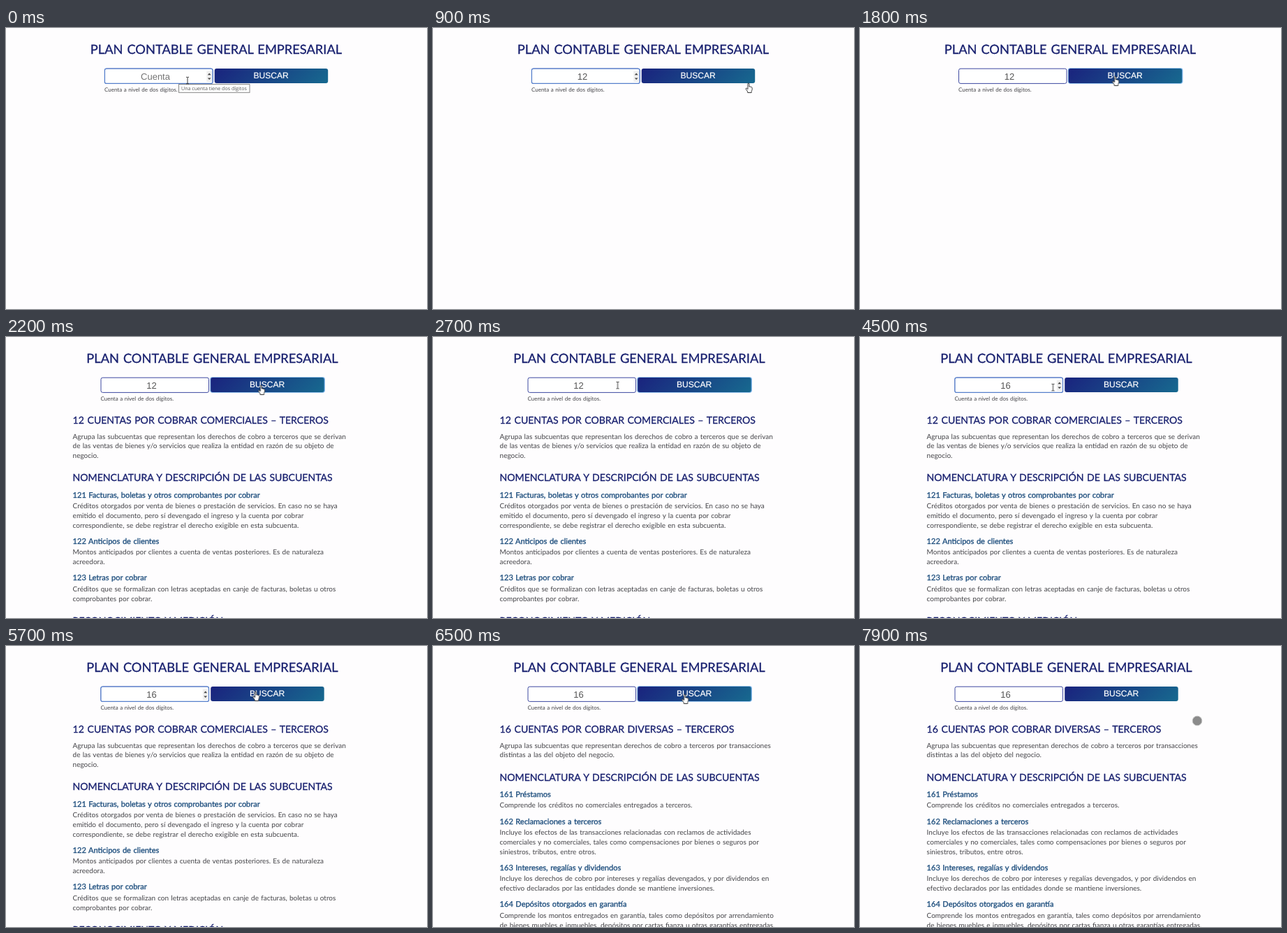
Animation of 603 by 402 pixels, one loop 8000 ms. Source, as an HTML page:

```html
<!DOCTYPE html>
<html lang="es">
<head>
<meta charset="utf-8">
<title>Plan contable</title>
<style>
html, body { margin: 0; width: 100%; height: 100%; overflow: hidden; background: #fefdfe; }
svg { display: block; width: 603px; height: 402px; }
text { font: 10px Lato, "Open Sans", sans-serif; word-spacing: .067em; fill: #444448; text-rendering: geometricPrecision; }
.title, .head { fill: #18206f; stroke: #18206f; stroke-width: .3px; }
.title { font-size: 18.28px; text-anchor: middle; }
.head { font-size: 14.08px; }
.sub { font-size: 11.03px; fill: #1f4f7e; stroke: #1f4f7e; stroke-width: .35px; }
.hint { font-size: 7.97px; }
.tip text { font: 7.1px "Open Sans", sans-serif; word-spacing: 0; fill: #575757; }
.field text, .label { font: 13px "Liberation Sans", Arial, sans-serif; text-anchor: middle; fill: #555; }
.field .empty { fill: #757575; }
.field .marked text { fill: #fff; }
.label { font-size: 12.05px; fill: #fff; stroke: #fff; stroke-width: .2px; }

/* Hard switches share one clock; 1% is 80 ms */
.form, .first, .second, .tip, .focus, .glow, .empty, .one, .twelve, .marked, .sixteen,
.beam, .hand, .arrow, .dot { animation: 8s step-end infinite; }
.form { animation-name: form; }
.first { animation-name: first; }
.second { animation-name: second; }
.tip { animation-name: tip; }
.focus { animation-name: focus; }
.glow { animation-name: glow; }
.empty { animation-name: empty; }
.one { animation-name: one; }
.twelve { animation-name: twelve; }
.marked { animation-name: marked; }
.sixteen { animation-name: sixteen; }
.beam { animation-name: beam; }
.hand { animation-name: hand; }
.arrow { animation-name: arrow; }
.dot { animation-name: dot; }
.cursor { animation: move 8s linear infinite; }

@keyframes form { 0% { transform: none; } 25%, 100% { transform: translateX(-5.5px); } }
@keyframes first { 0%, 75%, 100% { visibility: hidden; } 25% { visibility: visible; } }
@keyframes second { 0% { visibility: hidden; } 75%, 100% { visibility: visible; } }
@keyframes tip { 0% { visibility: visible; } 5%, 100% { visibility: hidden; } }
@keyframes focus { 0%, 41.25% { visibility: visible; } 18.75%, 73.75%, 100% { visibility: hidden; } }
@keyframes glow { 0%, 41.25%, 92.5%, 100% { visibility: hidden; } 18.75%, 73.75% { visibility: visible; } }
@keyframes empty { 0% { visibility: visible; } 5%, 100% { visibility: hidden; } }
@keyframes one { 0%, 7.5%, 55%, 100% { visibility: hidden; } 5%, 52.5% { visibility: visible; } }
@keyframes twelve { 0%, 43.75%, 100% { visibility: hidden; } 7.5% { visibility: visible; } }
@keyframes marked { 0%, 52.5%, 100% { visibility: hidden; } 43.75% { visibility: visible; } }
@keyframes sixteen { 0% { visibility: hidden; } 55%, 100% { visibility: visible; } }
@keyframes beam { 0%, 32.2% { visibility: visible; } 7.5%, 59.5%, 100% { visibility: hidden; } }
@keyframes hand { 0%, 32.2%, 84.7%, 100% { visibility: hidden; } 7.5%, 59.5% { visibility: visible; } }
@keyframes arrow { 0%, 92.5%, 100% { visibility: hidden; } 84.7% { visibility: visible; } }
@keyframes dot { 0% { visibility: hidden; } 92.5%, 100% { visibility: visible; } }
@keyframes move {
  0%, 5% { transform: translate(260px, 75px); }
  7.5% { transform: translate(300px, 76px); }
  11.25% { transform: translate(452px, 79px); }
  16.25% { transform: translate(380px, 72px); }
  18.75%, 27.5% { transform: translate(365.5px, 69px); }
  33.75%, 36.25% { transform: translate(264.5px, 69px); }
  41.25%, 57.5% { transform: translate(276.5px, 72px); }
  67.5%, 73.75% { transform: translate(357.5px, 65px); }
  78.75%, 82.5% { transform: translate(360.5px, 69px); }
  87.5% { transform: translate(578px, 95px); }
  90.6%, 100% { transform: translate(483px, 107px); }
}
</style>
</head>
<body>
<svg viewBox="0 0 603 402">
  <defs>
    <linearGradient id="blue" gradientUnits="userSpaceOnUse" x1="334" y1="23" x2="426" y2="114">
      <stop stop-color="#1a237e"/>
      <stop offset="1" stop-color="#17698f"/>
    </linearGradient>
  </defs>
  <rect width="603" height="402" fill="#fefdfe"/>

  <g class="form">
    <text class="title" x="301" y="37">PLAN CONTABLE GENERAL EMPRESARIAL</text>
    <g class="field">
      <rect x="141.5" y="58.2" width="154.5" height="21.2" rx="2.5" fill="#fff" stroke="#3d48a0"/>
      <g class="focus">
        <rect x="141.4" y="58.2" width="154.6" height="21.2" rx="2.5" fill="#fff" stroke="#567fcc" stroke-width="1.3"/>
        <rect x="287.3" y="61.5" width="7.4" height="15.5" fill="#efefef"/>
        <path d="M288.8 67.2l2.4-2.7 2.4 2.7zM288.8 71.4l2.4 2.7 2.4-2.7z" fill="#444"/>
      </g>
      <text class="empty" x="214" y="73.6">Cuenta</text>
      <text class="one" x="214" y="73.6">1</text>
      <text class="twelve" x="214" y="73.6">12</text>
      <g class="marked">
        <rect x="206.5" y="61.3" width="15.2" height="15" fill="#3390ff"/>
        <text x="214" y="73.6">12</text>
      </g>
      <text class="sixteen" x="214" y="73.6">16</text>
    </g>
    <rect class="glow" x="297.8" y="57.3" width="164.6" height="22.4" rx="3.4" fill="#7db4ea"/>
    <rect x="298.7" y="58" width="162.5" height="21" rx="3" fill="url(#blue)"/>
    <text class="label" x="379.7" y="72.3">BUSCAR</text>
    <text class="hint" x="141" y="90.7">Cuenta a nivel de dos dígitos.</text>
  </g>

  <g class="first" transform="translate(95.6 0)">
    <text class="head" y="124">12 CUENTAS POR COBRAR COMERCIALES – TERCEROS</text>
    <text y="145.5">Agrupa las subcuentas que representan los derechos de cobro a terceros que se derivan</text>
    <text y="159.3">de las ventas de bienes y/o servicios que realiza la entidad en razón de su objeto de</text>
    <text y="173">negocio.</text>
    <text class="head" y="206.3">NOMENCLATURA Y DESCRIPCIÓN DE LAS SUBCUENTAS</text>
    <text class="sub" y="229.5">121 Facturas, boletas y otros comprobantes por cobrar</text>
    <text y="245">Créditos otorgados por venta de bienes o prestación de servicios. En caso no se haya</text>
    <text y="258.8">emitido el documento, pero sí devengado el ingreso y la cuenta por cobrar</text>
    <text y="272.5">correspondiente, se debe registrar el derecho exigible en esta subcuenta.</text>
    <text class="sub" y="295.7">122 Anticipos de clientes</text>
    <text y="311.3">Montos anticipados por clientes a cuenta de ventas posteriores. Es de naturaleza</text>
    <text y="325">acreedora.</text>
    <text class="sub" y="348.2">123 Letras por cobrar</text>
    <text y="363.8">Créditos que se formalizan con letras aceptadas en canje de facturas, boletas u otros</text>
    <text y="377.5">comprobantes por cobrar.</text>
    <text class="head" y="411">RECONOCIMIENTO Y MEDICIÓN</text>
  </g>

  <g class="second" transform="translate(95.6 0)">
    <text class="head" y="124">16 CUENTAS POR COBRAR DIVERSAS – TERCEROS</text>
    <text y="145.5">Agrupa las subcuentas que representan derechos de cobro a terceros por transacciones</text>
    <text y="159.3">distintas a las del objeto del negocio.</text>
    <text class="head" y="192.5">NOMENCLATURA Y DESCRIPCIÓN DE LAS SUBCUENTAS</text>
    <text class="sub" y="215.8">161 Préstamos</text>
    <text y="231.2">Comprende los créditos no comerciales entregados a terceros.</text>
    <text class="sub" y="254.5">162 Reclamaciones a terceros</text>
    <text y="270">Incluye los efectos de las transacciones relacionadas con reclamos de actividades</text>
    <text y="283.8">comerciales y no comerciales, tales como compensaciones por bienes o seguros por</text>
    <text y="297.5">siniestros, tributos, entre otros.</text>
    <text class="sub" y="320.7">163 Intereses, regalías y dividendos</text>
    <text y="336.2">Incluye los derechos de cobro por intereses y regalías devengados, y por dividendos en</text>
    <text y="350">efectivo declarados por las entidades donde se mantiene inversiones.</text>
    <text class="sub" y="373.3">164 Depósitos otorgados en garantía</text>
    <text y="388.8">Comprende los montos entregados en garantía, tales como depósitos por arrendamiento</text>
    <text y="402.5">de bienes muebles e inmuebles, depósitos por cartas fianza u otras garantías entregadas.</text>
  </g>

  <g class="tip">
    <rect x="247.5" y="80.5" width="101.5" height="11.8" fill="#fff" stroke="#858585"/>
    <text x="251" y="89">Una cuenta tiene dos dígitos</text>
  </g>

  <g class="cursor">
    <path class="beam" d="M-2-4.7H-.5L0-4.2.5-4.7H2M0-4.2V4.4M-2 4.9H-.5L0 4.4.5 4.9H2" fill="none" stroke="#222" stroke-width=".9"/>
    <path class="hand" d="M-1 .6Q0-.8 1 .6V5L2.4 4.8 3.2 5.4 4.4 5.3 5.2 6.4V9.5L4.2 11.5V13.5H-1.2V12L-3.8 8.4Q-4 6.8-2.6 7.2L-1 8.6Z" fill="#fff" stroke="#222" stroke-width=".9" stroke-linejoin="round"/>
    <path class="arrow" d="M0 0V11.5L2.7 9 4.5 13 6.2 12.2 4.5 8.3H8Z" fill="#fff" stroke="#222" stroke-width=".8"/>
    <circle class="dot" r="6.8" fill="#8b8b8b" stroke="#c4c4c4"/>
  </g>
</svg>
</body>
</html>
```
